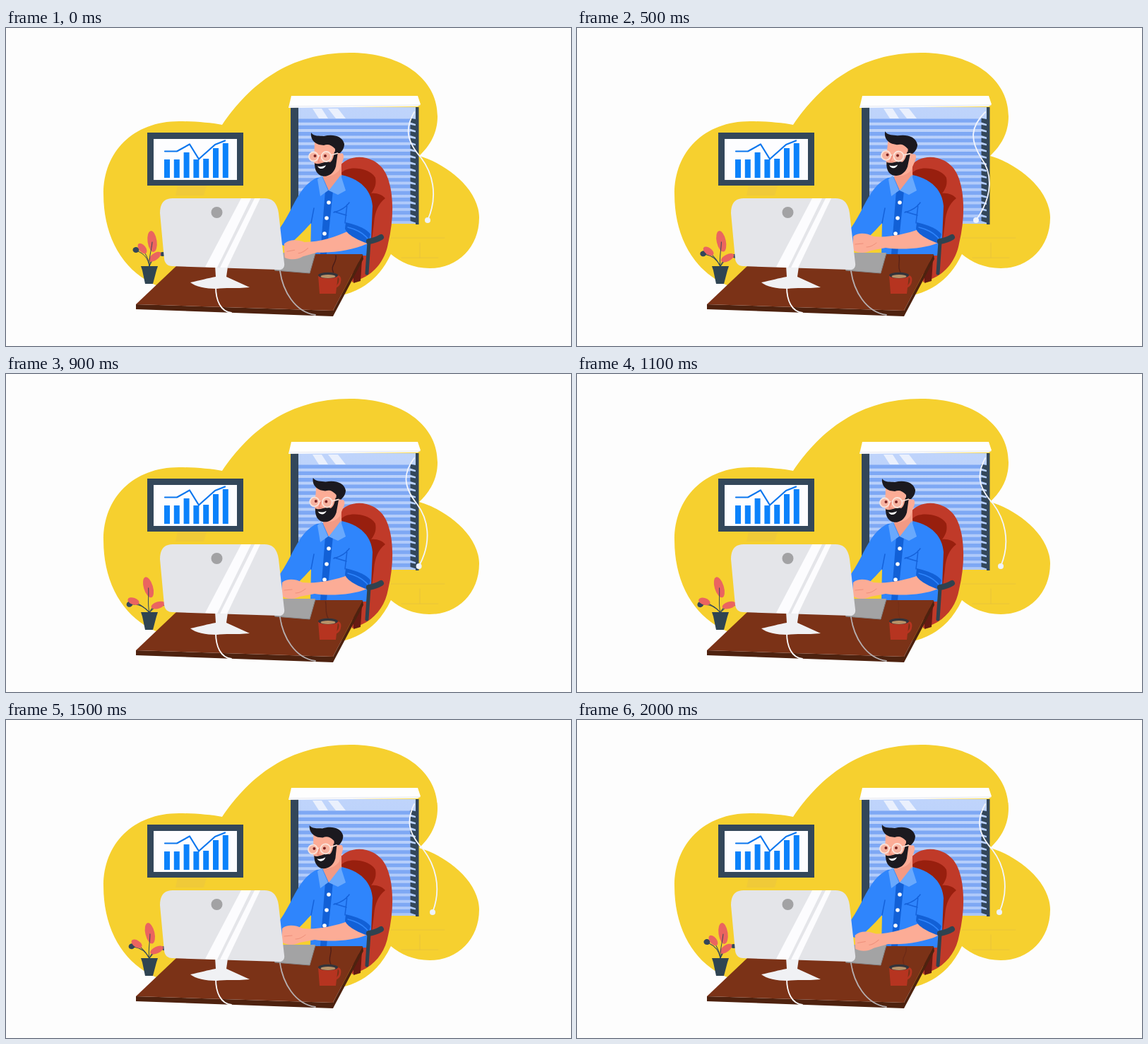
An HTML page that plays this animation: 800 by 450 pixels, repeating every 2050 ms.

```html
<!DOCTYPE html>
<html lang="en">
<head>
<meta charset="utf-8">
<title>Office desk</title>
<style>
  html, body { margin: 0; width: 100%; height: 100%; overflow: hidden; background: #fdfdfd; }
  svg { display: block; width: 100vw; height: 100vh; }
  .line { fill: none; stroke-linecap: round; stroke-linejoin: round; }
  .skin { fill: #fcac96; }
  .navy { fill: #33475a; }
  .ink { fill: #1b191f; }
  .shade { fill: #1260d6; }
  .coral { fill: #ea6460; }
</style>
</head>
<body>
<svg viewBox="0 0 800 450">
  <defs>
    <linearGradient id="glass" x1="0" y1="0" x2="0" y2="1">
      <stop offset="0" stop-color="#bfd4fb"/>
      <stop offset="1" stop-color="#adc8fa"/>
    </linearGradient>
  </defs>

  <path fill="#f6d02f" d="M306 137C345 80 400 35 487 35C560 35 611 72 611 125C611 148 601 166 585 181
    C620 191 669 225 670 268C670 310 640 340 600 340C577 340 558 331 545 320C530 352 508 369 480 377
    H230L215 365C165 345 138 295 138 235C138 175 180 132 245 132C265 132 290 134 306 137Z"/>
  <path fill="#f0ca38" d="M243 223H284L280 237H240Z"/>
  <path class="line" stroke="#e9c43a" d="M545 297H621M560 325H612M586 304V325"/>

  <!-- wall chart -->
  <path class="navy" d="M200 148H336V223H200Z"/>
  <path fill="#fdfdff" d="M209 157H327V215H209Z"/>
  <g id="bars" fill="#0b82fb"></g>
  <path class="line" stroke="#0b76ee" stroke-width="2.2" d="M225 174.500H242L260 164.500L273 185.500L296 165L310 159.500"/>

  <!-- window -->
  <path fill="url(#glass)" d="M413 112H582V277H413Z"/>
  <path fill="#eaf0fd" d="M434 114H447L456 128H443ZM456 114H470L481 128H467Z"/>
  <g id="slats"></g>
  <path class="navy" d="M403 112H414V278H403ZM580 112H584.500V278H580Z"/>
  <path fill="#fefefe" d="M404 96H583L587 108L583 111L400 113Z"/>
  <path class="line" stroke="#e5e7f0" d="M401 111L586 109"/>
  <path id="cord" class="line" stroke="#f3f5fc" stroke-width="1.800"/>
  <circle id="knob" r="4" cy="272" fill="#eef3fd"/>

  <!-- chair -->
  <path fill="#c03a29" d="M470 198C484 178 514 178 531 196C548 214 552 260 541 305C537 328 522 348 500 356L490 360V330L510 300Z"/>
  <path fill="#981f0e" d="M475 205C483 194 515 197 523 212C525 222 521 229 517 234C525 233 533 236 537 241C528 248 522 259 521 276L518 300L480 220Z"/>
  <path fill="#661b12" d="M492 335L504 328L502 358L492 361Z"/>

  <!-- shirt -->
  <path fill="#2f85fc" d="M440 212L475 208C500 213 517 228 519 252L517 300L510 322H431L432 276C420 289 408 302 396 309
    L386 305L388 283C406 258 414 224 440 212Z"/>
  <path class="shade" d="M452 230H463L454 320H445Z"/>
  <path class="line" stroke="#1562da" stroke-width="1.500" d="M464 261C475 258 482 253 486 247M465 260L482 265M483 250L480 276M432 276L436 255"/>
  <g fill="#fff"><circle cx="457" cy="247" r="2.800"/><circle cx="454" cy="269" r="2.800"/><circle cx="451" cy="291" r="2.800"/></g>
  <path fill="#f39a84" d="M450 203L475 190V213L457 230L449 212Z"/>
  <path fill="#69a9fd" d="M447 209L456 230L445 238L441 214ZM474 208L481 230L470 236L457 230Z"/>

  <g id="head">
    <path class="skin" d="M437 161L472 164L473 178C478 175 480 182 476 190L472 201C462 213 445 212 439 200L436 190Z"/>
    <path class="ink" d="M432 148C436 154 444 152 450 153C462 150 476 152 479 164C479 170 476 174 473 177H466L466 171
      C460 165 456 164 450 166L443 165C435 162 431 156 432 148Z"/>
    <path class="ink" d="M437 191C443 195 452 187 459 190C463 187 464 182 465 175H470L467 196C463 210 450 212 444 208C438 204 437 197 437 191Z"/>
    <path fill="#fff" d="M441 195.500C446 197 449 196 453 194C451 200 444 201 441 195.500Z"/>
    <g fill="#f7b3a0" stroke="#fae3da" stroke-width="1.800">
      <circle cx="435.500" cy="182" r="6.500"/><circle cx="453.500" cy="182" r="7"/>
      <path d="M442 181H446M460 180L470 177"/>
    </g>
    <g fill="#7d2422"><circle cx="437.500" cy="181" r="2"/><circle cx="452" cy="181" r="2"/></g>
    <path class="line" stroke="#ee8b77" stroke-width="1.500" d="M445 181L442 190L446 190"/>
  </g>

  <!-- plant -->
  <g id="plant">
    <g id="farLeft"><path class="line" stroke="#33475a" d="M203 337C201 326 196 320 187 316"/>
      <ellipse class="navy" cx="184" cy="314" rx="4.500" ry="4"/></g>
    <g id="left"><path class="line" stroke="#33475a" d="M203 337C202 328 199 322 194 314"/>
      <ellipse class="coral" cx="193" cy="312" rx="4.800" ry="8.500" transform="rotate(-38 193 312)"/></g>
    <g id="farRight"><path class="line" stroke="#33475a" d="M203 337C205 326 212 322 219 320"/>
      <ellipse class="navy" cx="222" cy="320" rx="4" ry="3"/></g>
    <g id="right"><path class="line" stroke="#33475a" d="M203 337L208 327"/>
      <ellipse class="coral" cx="211.500" cy="323.500" rx="4.800" ry="10" transform="rotate(54 211 323)"/></g>
    <g id="middle"><ellipse class="coral" cx="207" cy="302" rx="6.500" ry="15" transform="rotate(-8 207 302)"/>
      <path class="line" stroke="#33475a" d="M203 337C202 325 206 315 207 303"/></g>
  </g>
  <path fill="#2f4452" d="M191 337H215L213 343L208 362H197L193 343Z"/>

  <!-- desk -->
  <path fill="#4e220f" d="M184 391L463 400L505 320L506 327L463 408L184 398Z"/>
  <path fill="#7b3217" d="M241 337L395 320H505L463 400L184 391Z"/>
  <path fill="#a3a3a4" d="M392 318H438L430 347L380 343Z"/>
  <path class="line" stroke="#858587" d="M381 343L430 347L438 319"/>

  <g id="arm"><path class="skin" d="M486 284L513 303C498 311 462 315 437 311L416 315C408 319 398 319 390 314L391 295
    C398 289 410 290 420 295C440 297 465 292 486 284Z"/>
    <path class="line" stroke="#ee907b" d="M394 306L405 305M410 310C416 310 420 307 424 304"/></g>
  <path class="shade" d="M481 275C495 278 511 284 516 292L512 305C500 301 483 293 480 284Z"/>
  <path class="line" stroke="#2f85fc" stroke-width="1.500" d="M484 282C496 285 506 290 512 298"/>
  <path class="line" stroke="#30424f" stroke-width="8" d="M514 302C519 301 526 299 531 296"/>
  <path class="line" stroke="#30424f" stroke-width="5" d="M514 303L511 347"/>

  <path id="steam" class="line" stroke="#4b1c18" stroke-width="1.400"/>
  <path class="line" stroke="#b63420" stroke-width="2.800" d="M468 352C475 349 475 363 466 367"/>
  <path fill="#b63420" d="M442 350H470L467 376H444Z"/>
  <ellipse cx="456" cy="350" rx="14" ry="4.200" fill="#33343b"/>
  <ellipse cx="456" cy="351.500" rx="10.500" ry="2.600" fill="#b99268"/>

  <!-- computer -->
  <path class="line" stroke="#fbfbfd" stroke-width="1.800" d="M297 366C297 386 304 401 319 403"/>
  <path class="line" stroke="#b5adae" stroke-width="1.800" d="M388 344C392 372 409 402 438 406"/>
  <path fill="#f0f1f4" d="M296 336L314 338L312 352L345 367C325 369 310 367 298 369C283 369 268 366 261 360C275 357 286 354 297 352Z"/>
  <path fill="#e4e5e9" d="M236 241H366C378 241 384 248 386 262L394 333C395 339 391 343 386 342L235 337C229 337 225 333 224 327L218 262C218 248 224 241 236 241Z"/>
  <path fill="#fcfcfe" d="M333 241H347L299 339L282 338ZM352 241H360L313 339.500L303 339Z"/>
  <circle cx="298.500" cy="261" r="8" fill="#a2a2a4"/>
</svg>

<script>
const LOOP = 2050, STEP = 50;
const $ = id => document.getElementById(id);

function add(parent, d, fill) {
  const path = document.createElementNS("http://www.w3.org/2000/svg", "path");
  path.setAttribute("d", d);
  if (fill) path.setAttribute("fill", fill);
  parent.append(path);
}

[186, 186, 176, 186, 185, 170, 163].forEach((top, i) =>
  add($("bars"), `M${224 + i * 13.8} ${top}h8V212h-8Z`));

for (let y = 128.5; y < 276; y += 9.3) {
  add($("slats"), `M414 ${y}H582v5.3H414Z`, "#7ea8f4");
  add($("slats"), `M572.5 ${y - 1}l9 2v7l-9 -3Z`, "#33475a");
}

// Smooth periodic curve through [time, value] knots.
function curve(knots) {
  const n = knots.length;
  const at = i => {
    const [t, v] = knots[(i + n) % n];
    return [t + LOOP * Math.floor(i / n), v];
  };
  const slope = i => {
    const [a, b, c] = [at(i - 1), at(i), at(i + 1)];
    const before = (b[1] - a[1]) / (b[0] - a[0]);
    const after = (c[1] - b[1]) / (c[0] - b[0]);
    return before * after <= 0 ? 0 : 2 * before * after / (before + after);
  };
  return t => {
    let i = n - 1;
    while (i > 0 && knots[i][0] > t) i--;
    const [t0, v0] = at(i), [t1, v1] = at(i + 1);
    const h = t1 - t0, u = (t - t0) / h, w = 1 - u;
    return v0 * w * w * (1 + 2 * u) + v1 * u * u * (3 - 2 * u)
      + h * u * w * (slope(i) * w - slope(i + 1) * u);
  };
}

const cordX = curve([[0, 597], [200, 585], [500, 565], [570, 564], [700, 568], [1100, 600], [1350, 605], [1500, 604], [2000, 598]]);
const headTilt = curve([[0, 0], [200, 1], [500, 3.7], [660, 4.6], [700, 4.5], [1100, 0], [1450, -2.1], [2000, -0.1]]);
const press = curve([[0, .65], [50, .55], [170, 0], [530, 0], [700, 1], [850, 0], [1230, 0], [1350, .7], [1480, 0], [1900, 0], [2000, .6]]);
const steamX = curve([[0, 467], [200, 466], [500, 456], [700, 451], [1100, 455], [1500, 460], [2000, 466]]);
const steamAlpha = curve([[0, 1], [200, .9], [500, .7], [700, .9], [1100, .1], [1500, .9], [1950, .1], [2000, .3]]);

const turn = (id, deg, x, y, shift = 0) =>
  $(id).setAttribute("transform", `translate(${shift} 0) rotate(${deg} ${x} ${y})`);

function draw(t) {
  const end = cordX(t);
  const left = 571 + (end - 597) * .28, right = 605 + (end - 597) * .7;
  const mid = (left + right) / 2;
  $("cord").setAttribute("d", `M578 119C${left - 5} 140 ${left - 6} 158 ${mid} 184C${mid + 15} 204 ${right + 8} 236 ${end} 272`);
  $("knob").setAttribute("cx", end);

  turn("head", headTilt(t), 462, 212);
  const down = press(t);
  turn("arm", -8 * down, 508, 298, 4 * down);

  const open = .5 - .5 * Math.cos(2 * Math.PI * t / LOOP);
  const spread = { farLeft: -29, left: -34, middle: -9, right: 20, farRight: 16 };
  for (const leaf in spread) turn(leaf, spread[leaf] * open, 203, 338);

  const x = steamX(t);
  $("steam").setAttribute("d", `M${x} 322C${x + 2} 332 ${(x + 458) / 2 - 4} 336 ${(x + 460) / 2} 346`);
  $("steam").setAttribute("opacity", steamAlpha(t));
}

const start = performance.now();
function tick() {
  const t = (performance.now() - start) % LOOP;
  draw(Math.floor(t / STEP) * STEP);
  requestAnimationFrame(tick);
}
tick();
</script>
</body>
</html>
```
